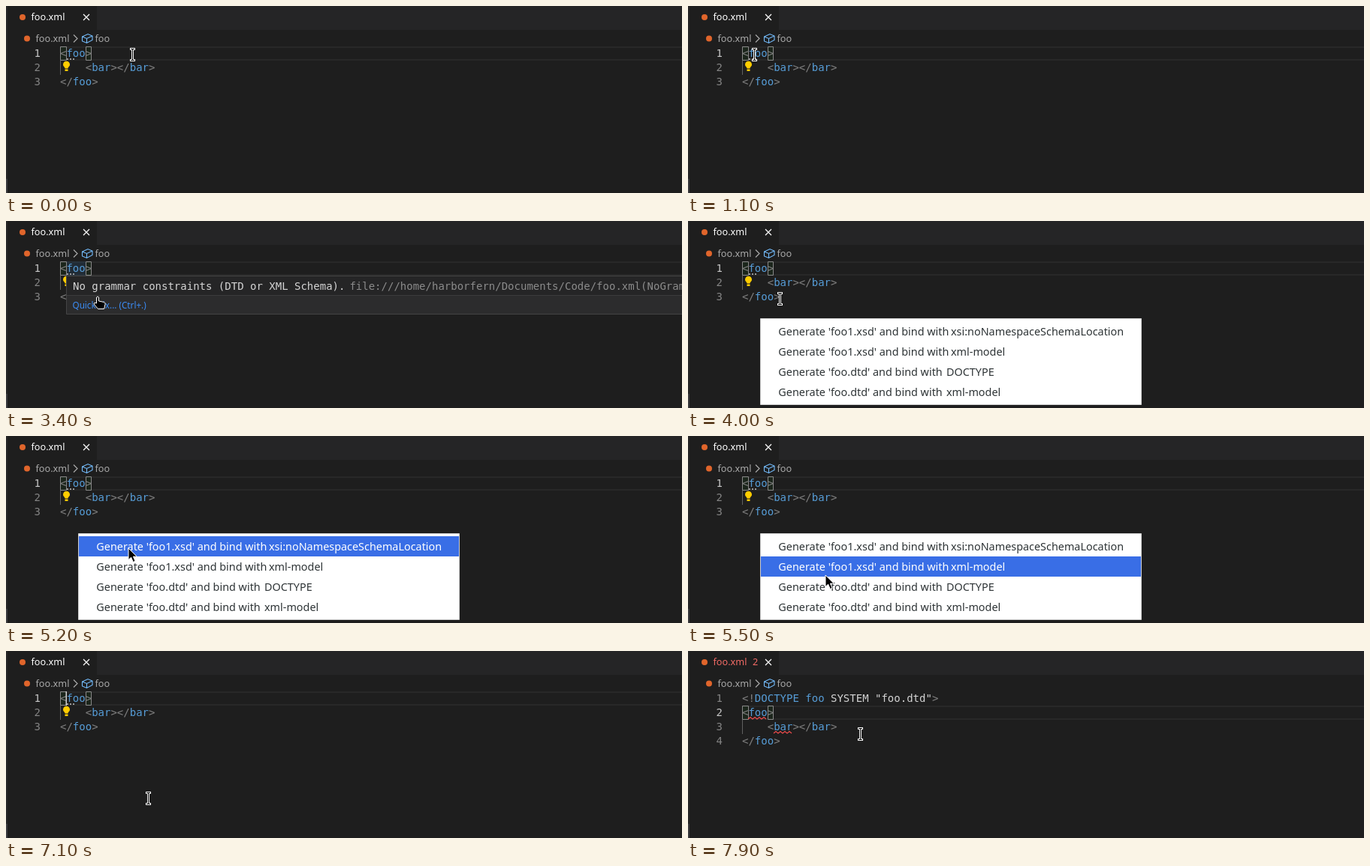
Write an HTML page that moves like this. It is 900 px wide and 250 px high and loops after 8 s.

```html
<!DOCTYPE html>
<html lang="en">
<head>
<meta charset="utf-8">
<title>Generating a grammar for an XML file</title>
<style>
  html, body { margin: 0; height: 100%; overflow: hidden; background: #1e1e1e; }
  svg { display: block; width: 900px; height: 250px; }
  text { white-space: pre; }
  .code { font: 14px "DejaVu Sans Mono", monospace; fill: #808080; }
  .ui { font: 12.7px "Noto Sans", "Open Sans", sans-serif; fill: #a9a9a9; }
  .menu { font: 14.4px "Noto Sans", "Open Sans", sans-serif; fill: #2e3436; }
  .tag { fill: #569cd6; }
  .plain { fill: #d4d4d4; }
  .line { fill: none; }
</style>
</head>
<body>
<svg viewBox="0 0 900 250">
  <!-- tab bar and breadcrumbs -->
  <rect width="900" height="250" fill="#1e1e1e"/>
  <rect x="121" width="779" height="32" fill="#252526"/>
  <rect width="2" height="250" fill="#272728"/>
  <rect y="231" width="2" height="19" fill="#3c3c40"/>
  <circle cx="22" cy="15" r="4" fill="#e0652b"/>
  <circle cx="28" cy="43.500" r="4" fill="#e0652b"/>
  <g id="tab" class="ui">
    <text x="33.500" y="19">foo.xml</text>
    <text id="count" x="86" y="19">2</text>
  </g>
  <path class="line" d="M103 11l8 8m0-8l-8 8" stroke="#fff" stroke-width="1.200"/>
  <g class="ui">
    <text x="39.500" y="48">foo.xml</text>
    <text x="118.500" y="48">foo</text>
  </g>
  <path class="line" d="M90 38.500l5 5-5 5" stroke="#a9a9a9" stroke-width="1.200"/>
  <path class="line" d="M101.500 41l7.500-3.500 6 2.500v5.500l-7.500 4-6-2.500zl6 2.500 7.500-3.500m-7.500 3.500v6" stroke="#75beff" stroke-width="1.100"/>

  <!-- editor -->
  <g id="numbers" class="code"></g>
  <text id="doctype" class="code" x="72" y="68">&lt;!<tspan class="tag">DOCTYPE foo</tspan><tspan class="plain"> SYSTEM "foo.dtd"</tspan>&gt;</text>
  <g id="doc">
    <path class="line" d="M72 55h828M72 72h828" stroke="#282828" stroke-width="2"/>
    <rect id="range" x="80" y="54" width="26" height="19" fill="#264f78" opacity=".25"/>
    <path d="M72.500 54.500h8v18h-8zm34 0h7v18h-7z" fill="#006400" fill-opacity=".1" stroke="#888"/>
    <path class="line" d="M72.500 73v19" stroke="#606060"/>
    <g class="code">
      <text x="72" y="68">&lt;<tspan class="tag">foo</tspan>&gt;</text>
      <text x="105.700" y="87">&lt;<tspan class="tag">bar</tspan>&gt;&lt;/<tspan class="tag">bar</tspan>&gt;</text>
      <text x="72" y="106">&lt;/<tspan class="tag">foo</tspan>&gt;</text>
    </g>
    <g id="hint">
      <path class="line" d="M81 71h2m2 0h2m2 0h2" stroke="#c0c0c0" stroke-width="1.500"/>
      <path d="M78.500 83.500c0-2-2.500-2.500-2.500-5.200a4.500 4.500 0 0 1 9 0c0 2.700-2.500 3.200-2.500 5.200zm0 1h4v2.500h-4z" fill="#fc0"/>
    </g>
    <path id="squiggles" class="line" stroke="#f14c4c" stroke-width="1.100"/>
    <rect id="caret" x="79.500" y="54" width="1.500" height="19" fill="#d0d0d0"/>
  </g>

  <!-- hover message -->
  <g id="hover">
    <path d="M80.500 73.500h830v51h-830z" fill="#252526" stroke="#454545"/>
    <path d="M81 99.500h829v24.500h-829z" fill="#2c2c2d"/>
    <path class="line" d="M81 99.500h829" stroke="#3c3c3d"/>
    <g class="code">
      <text class="plain" x="89" y="92">No grammar constraints (DTD or XML Schema).</text>
      <text x="457.400" y="92" style="fill:#8b8b8b">file:///home/harborfern/Documents/Code/foo.xml(NoGrammarConstraints)</text>
    </g>
    <text class="ui" x="88.500" y="117" style="font-size:11.7px;fill:#3b8cf5">Quick Fix... (Ctrl+.)</text>
  </g>

  <!-- quick fix menu -->
  <g id="menu" class="menu">
    <path d="M96.500 130.500h507v115h-507z" fill="#fff" stroke="#d0d0d0"/>
    <rect id="selection" x="97" width="506" height="27" fill="#396ee6"/>
  </g>

  <!-- pointers -->
  <g id="pointer" stroke-linejoin="round">
    <g id="ibeam" class="line">
      <path d="M-3 -7.500h7M.5 -7.500v15M-3 7.500h7" stroke="#fff" stroke-width="3"/>
      <path d="M-2 -7.500h5M.5 -7.500v15M-2 7.500h5" stroke="#000"/>
    </g>
    <path id="arrow" d="M0 0v15.500l3.600-3.300 2.700 6.300 2.800-1.200-2.700-6.100h4.900z" stroke="#fff"/>
    <path id="hand" d="M-1.500 6v-8q1.500-2 3 0v5l7 1.500q2 .5 1.500 3l-1.500 6h-8l-5.500-6.500q0-2 2-1.500z" stroke="#fff"/>
  </g>
</svg>
<script>
const LOOP = 8000, STEP = 100;
const HOVER = 1500, MENU = 4000, ARROW = 4600, CLOSE = 7100, INSERT = 7200, ERRORS = 7300, BLINK = 7600;

// Pointer stops: time, x, y
const stops = [
  [500, 168, 65], [1100, 88, 65], [1900, 88, 65], [2000, 88, 64],
  [2600, 88, 64], [3200, 120, 102], [3300, 120, 102], [3400, 122, 104],
  [4500, 122, 104], [4600, 124, 105], [4700, 124, 105], [5200, 163, 150],
  [5600, 187, 193], [5700, 189, 195], [5800, 189, 195], [5900, 190, 197],
  [7500, 189, 197], [7900, 229, 111]
];

const $ = id => document.getElementById(id);
const show = (id, on) => $(id).setAttribute('visibility', on ? 'visible' : 'hidden');

function add(parent, content, x, y) {
  const text = document.createElementNS('http://www.w3.org/2000/svg', 'text');
  text.setAttribute('x', x);
  text.setAttribute('y', y);
  text.textContent = content;
  return $(parent).appendChild(text);
}

const numbers = [1, 2, 3, 4].map((n, i) => add('numbers', n, 37.6, 68 + 19 * i));

const rowTop = i => 134 + 27 * i;
const items = [
  ['foo1.xsd', 'xsi:noNamespaceSchemaLocation'], ['foo1.xsd', 'xml-model'],
  ['foo.dtd', 'DOCTYPE'], ['foo.dtd', 'xml-model']
].map(([file, target], i) => [
  add('menu', `Generate '${file}' and bind with`, 120.3, rowTop(i) + 19),
  add('menu', target, i < 2 ? 350 : 344, rowTop(i) + 19)
]);

const squiggle = (x, y) => `M${x} ${y}` + 'l3 -2.500l3 2.500'.repeat(4);
$('squiggles').setAttribute('d', squiggle(80, 72) + squiggle(114, 91));

function pointerAt(t) {
  const next = stops.findIndex(s => s[0] > t);
  if (next === 0) return stops[0].slice(1);
  if (next < 0) return stops[stops.length - 1].slice(1);
  const [t0, x0, y0] = stops[next - 1], [t1, x1, y1] = stops[next];
  const u = (t - t0) / (t1 - t0), k = u * u * (3 - 2 * u);
  return [Math.round(x0 + (x1 - x0) * k), Math.round(y0 + (y1 - y0) * k)];
}

function draw(t) {
  const [x, y] = pointerAt(t);
  const hover = t >= HOVER && t < MENU;
  const menu = t >= MENU && t < CLOSE;
  const inserted = t >= INSERT, errors = t >= ERRORS;

  $('tab').querySelectorAll('text').forEach(e => e.style.fill = errors ? '#f26b66' : '#fff');
  show('count', errors);
  show('squiggles', errors);
  show('doctype', inserted);
  show('hint', !inserted);
  show('caret', t >= CLOSE && t < BLINK);
  $('doc').setAttribute('transform', `translate(0 ${inserted ? 19 : 0})`);
  numbers.forEach((e, i) => e.style.fill = i === +inserted ? '#c6c6c6' : '#858585');
  numbers[3].setAttribute('visibility', inserted ? 'visible' : 'hidden');

  show('range', hover);
  show('hover', hover);
  $('hover').setAttribute('opacity', t < HOVER + STEP ? 0.5 : 1);

  const arrow = menu && t >= ARROW;
  const row = arrow ? Math.floor((y - rowTop(0)) / 27) : -1;
  $('menu').style.display = menu ? '' : 'none';
  show('selection', menu && row >= 0);
  $('selection').setAttribute('y', rowTop(Math.max(row, 0)));
  items.forEach((parts, i) => parts.forEach(e => e.style.fill = i === row ? '#fff' : ''));

  const hand = hover && y > 99;
  show('arrow', arrow);
  show('hand', hand);
  show('ibeam', !arrow && !hand);
  $('pointer').setAttribute('transform', `translate(${x} ${y})`);
}

function tick() {
  const t = performance.now() % LOOP;
  draw(Math.floor(t / STEP) * STEP);
  requestAnimationFrame(tick);
}
tick();
</script>
</body>
</html>
```
